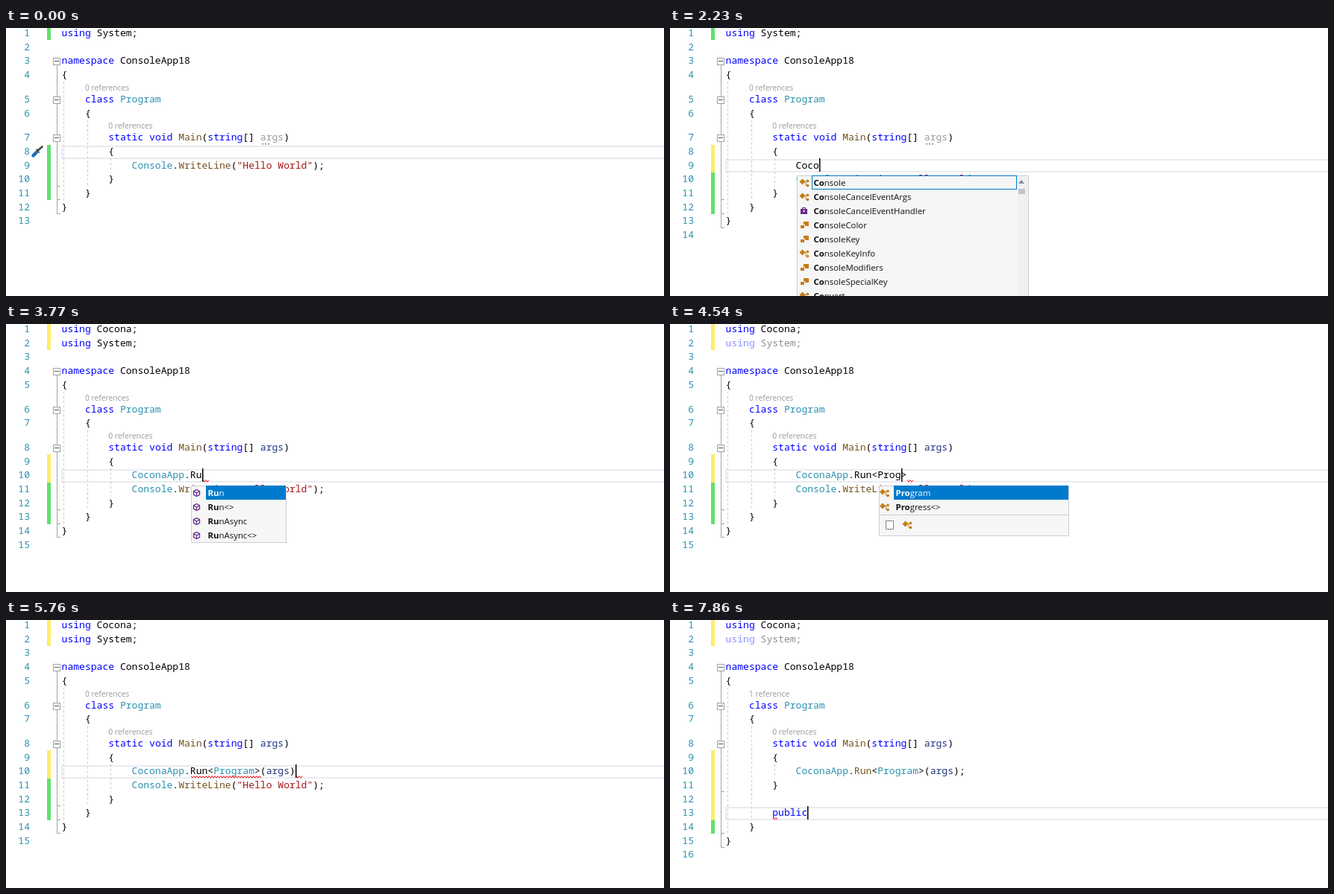
These frames come from a looping animation (882 px wide and 360 px high, 8 s). An HTML page with a canvas:

```html
<!DOCTYPE html>
<html lang="en">
<head>
<meta charset="utf-8">
<title>Code editor</title>
<style>
html, body { margin: 0; width: 100%; height: 100%; overflow: hidden; background: #fff; }
canvas { display: block; width: 882px; height: 360px; }
</style>
</head>
<body>
<canvas id="stage"></canvas>
<script>
const W = 882, H = 360, LOOP = 8000;
const LEFT = 74.6, CW = 7.83, PITCH = 18.7, LENS = 14;
const MONO = '"Noto Sans Mono", "DejaVu Sans Mono", monospace';
const SANS = '"Open Sans", "Noto Sans", sans-serif';
const BLUE = '#0000ff', TEAL = '#2b91af', BROWN = '#74531f', NAVY = '#1f377f';
const GREEN = '#62df70', YELLOW = '#ffec6a', PANEL = '#f6f6f6', EDGE = '#cccedb', LINK = '#0067b5';

const canvas = document.getElementById('stage');
const g = canvas.getContext('2d');
const dpr = window.devicePixelRatio || 1;
canvas.width = W * dpr;
canvas.height = H * dpr;

// Latest value whose start time has passed.
const at = (t, steps) => steps.reduce((v, [from, value]) => t >= from ? value : v, null);
const within = (t, a, b) => t >= a && t < b;

const APP = 'CoconaApp', RUN = APP + '.Run', CALL = RUN + '<Program>';
const TYPED = [
  [1260, '|'], [1690, 'C|'], [1860, 'Co|'], [2000, 'Coc|'], [2230, 'Coco|'], [2300, 'Cocon|'],
  [2370, 'Cocona|'], [2550, 'CoconaA|'], [2600, 'CoconaAp|'], [2650, APP + '|'], [3300, APP + '.|'],
  [3560, APP + '.R|'], [3770, APP + '.Ru|'], [3850, RUN + '|'], [4060, RUN + '<|>'],
  [4310, RUN + '<P|>'], [4380, RUN + '<Pr|>'], [4450, RUN + '<Pro|>'], [4520, RUN + '<Prog|>'],
  [4600, RUN + '<Progr|>'], [4660, RUN + '<Progra|>'], [4730, RUN + '<Program|>'],
  [4870, CALL + '|'], [4940, CALL + '(|)'], [5230, CALL + '(a|)'], [5330, CALL + '(ar|)'],
  [5400, CALL + '(arg|)'], [5470, CALL + '(args|)'], [5650, CALL + '(args)|'], [5790, CALL + '(args);|']
];
const MEMBER = [
  [7070, '|'], [7210, 'p|'], [7320, 'pu|'], [7540, 'pub|'], [7570, 'publ|'], [7790, 'publi|'], [7860, 'public|']
];
const CARET = [
  [0, 0], [660, 1], [940, 0], [1260, 1], [1610, 0], [1690, 1], [2700, 0], [3050, 1],
  [5970, 0], [6180, 1], [6890, 0], [7070, 1]
];
const CURRENT = [
  [0, 'open'], [1260, 'typed'], [6180, 'print'], [6320, 'close'], [6610, 'blank'], [7070, 'member']
];

// First letter of each item is its icon: m method, k keyword, c class, d delegate, e enum.
const P_LIST = ['kparams', 'kpartial', 'ePlatformID', 'cPlatformNotSupportedException', 'dPredicate<>', 'kprivate', 'cProgram', 'cProgress<>'];
const C_LIST = ['cConsole', 'cConsoleCancelEventArgs', 'dConsoleCancelEventHandler', 'eConsoleColor', 'eConsoleKey', 'cConsoleKeyInfo', 'eConsoleModifiers', 'eConsoleSpecialKey', 'cConvert'];
const A_LIST = ['k#if', 'k#region', 'cAccessViolationException', 'dAction', 'dAction<>', 'cActivator', 'cAggregateException'];
const AR_LIST = ['kargs', 'cArgumentException', 'cArgumentNullException', 'cArgumentOutOfRangeException', 'cArithmeticException', 'cArray', 'cArraySegment<>'];
const RUN_LIST = ['mRun', 'mRun<>', 'mRunAsync', 'mRunAsync<>'];
const APP_LIST = ['mCreateHostBuilder', 'mEquals', 'mReferenceEquals', ...RUN_LIST];
const POPUPS = [
  [0, null],
  [1730, { x: 170, w: 311, row: 'typed', items: C_LIST, match: 1, sel: 0, wide: 1 }],
  [1860, { x: 170, w: 311, row: 'typed', items: C_LIST, match: 2, sel: 0, wide: 1 }],
  [2230, { x: 170, w: 311, row: 'typed', items: C_LIST, match: 2, soft: 1, wide: 1 }],
  [2680, null],
  [3350, { x: 248, w: 128, row: 'typed', items: APP_LIST, match: 0 }],
  [3630, { x: 248, w: 128, row: 'typed', items: APP_LIST, match: 0, sel: 3 }],
  [3770, { x: 248, w: 128, row: 'typed', items: RUN_LIST, match: 2, sel: 0 }],
  [3850, { x: 248, w: 128, row: 'typed', items: RUN_LIST, match: 3, sel: 0 }],
  [4060, null],
  [4330, { x: 280, w: 255, row: 'typed', items: P_LIST, match: 1, sel: 6, wide: 1 }],
  [4450, { x: 280, w: 255, row: 'typed', items: ['cProgram', 'cProgress<>'], match: 3, sel: 0, bar: 1 }],
  [4730, null],
  [5260, { x: 350, w: 312, row: 'typed', items: A_LIST, match: 1, wide: 1, drop: 23 }],
  [5330, { x: 350, w: 312, row: 'typed', items: AR_LIST, match: 2, sel: 0, wide: 1, drop: 23 }],
  [5470, null],
  [7260, { x: 138, w: 256, row: 'member', items: P_LIST, match: 1, sel: 5, wide: 1 }],
  [7540, { x: 138, w: 256, row: 'member', items: ['kpublic', 'cPlatformNotSupportedException'], match: 1, sel: 0, bar: 1 }],
  [7860, null]
];

function rect(x, y, w, h, fill, stroke) {
  if (fill) { g.fillStyle = fill; g.fillRect(x, y, w, h); }
  if (stroke) {
    g.strokeStyle = stroke;
    g.lineWidth = 1;
    g.strokeRect(x + 0.5, y + 0.5, w - 1, h - 1);
  }
}

function path(points, color, width = 1, fill = false) {
  g.beginPath();
  points.forEach(([x, y]) => g.lineTo(x, y));
  if (fill) { g.fillStyle = color; g.fill(); return; }
  g.strokeStyle = color;
  g.lineWidth = width;
  g.stroke();
}

function disc(x, y, r, color) {
  g.fillStyle = color;
  g.beginPath();
  g.arc(x, y, r, 0, 7);
  g.fill();
}

// Draws text around a vertical centre and returns the end position.
function label(s, x, yc, color = '#111', size = 11.4, weight = 400) {
  g.font = `${weight} ${size}px ${SANS}`;
  g.fillStyle = color;
  g.fillText(s, x, Math.round(yc + 4));
  return x + g.measureText(s).width;
}

const WORDS = {};
'using namespace class static void string public'.split(' ').forEach(w => WORDS[w] = BLUE);
'Program Console'.split(' ').forEach(w => WORDS[w] = TEAL);
'Main WriteLine'.split(' ').forEach(w => WORDS[w] = BROWN);

function wordColor(word, t, id) {
  if (word[0] === '"') return '#a31515';
  if (word === APP) return t >= 3300 ? TEAL : '#000';
  if (word === 'Run') return t >= 5830 ? BROWN : '#000';
  if (word === 'args') return id === 'main' && t < 2650 ? '#999' : NAVY;
  return WORDS[word] || '#000';
}

function code(s, x, yc, t, id, cw = CW) {
  g.font = `${cw / 0.6}px ${MONO}`;
  for (const m of s.matchAll(/"[^"]*"|\w+|[^\w\s"]+/g)) {
    g.fillStyle = wordColor(m[0], t, id);
    g.fillText(m[0], x + m.index * cw, Math.round(yc + 4));
  }
}

function squiggle(x0, x1, y) {
  const pts = [];
  for (let x = x0, i = 0; x <= x1; x += 2, i++) pts.push([x, y + (i % 2 ? 1.3 : -1.3)]);
  path(pts, '#f00');
}

// Current document with line positions.
function buildLines(t) {
  const typed = (at(t, TYPED) || '').replace('|', '');
  const member = (at(t, MEMBER) || '').replace('|', '');
  const pad = n => ' '.repeat(n);
  const lines = [];
  const add = (id, text, mark, lens) => lines.push({ id, text, mark, lens });
  const imported = t >= 3050;
  if (imported) add('cocona', 'using Cocona;', YELLOW);
  add('system', 'using System;', imported ? YELLOW : GREEN);
  add('gap', '');
  add('ns', 'namespace ConsoleApp18');
  add('nsOpen', '{');
  add('class', pad(4) + 'class Program', null, t >= 6610 ? '1 reference' : '0 references');
  add('classOpen', pad(4) + '{');
  add('main', pad(8) + 'static void Main(string[] args)', null, '0 references');
  add('open', pad(8) + '{', t >= 1260 ? YELLOW : GREEN);
  if (t >= 1260) add('typed', pad(12) + typed, YELLOW);
  if (t < 6320) add('print', pad(12) + 'Console.WriteLine("Hello World");', GREEN);
  add('close', pad(8) + '}', t >= 6610 ? YELLOW : GREEN);
  if (t >= 6610) add('blank', '', YELLOW);
  if (t >= 7070) add('member', pad(8) + member, YELLOW);
  add('classClose', pad(4) + '}', GREEN);
  add('nsClose', '}');
  add('end', '');
  let y = 7;
  lines.forEach((line, i) => {
    if (i) y += PITCH;
    if (line.lens) y += LENS;
    line.y = y;
    line.top = y - PITCH / 2;
    line.bottom = y + PITCH / 2;
  });
  return lines;
}

function screwdriver(y) {
  g.lineCap = 'round';
  path([[42, y - 1], [48.5, y - 6.5]], '#424242', 2.6);
  path([[41, y - 2.5], [44, y + 1]], '#424242', 2);
  path([[36.5, y + 5.5], [40.5, y + 1.5]], '#1c6fb5', 4.4);
  g.lineCap = 'butt';
}

function structure(row) {
  const end = Math.round(row.nsClose.bottom);
  path([[68.5, row.ns.y], [68.5, end]], '#a5a5a5');
  for (const id of ['close', 'classClose', 'nsClose']) {
    const y = Math.round(row[id].bottom) - 0.5;
    path([[68, y], [73, y]], '#a5a5a5');
  }
  for (const id of ['ns', 'class', 'main']) {
    const y = Math.round(row[id].y);
    rect(63, y - 4, 10, 10, '#fff', '#a0a0a0');
    path([[65, y + 0.5], [71, y + 0.5]], '#555');
  }
  g.setLineDash([3, 3]);
  [['nsOpen', 'nsClose', 77.5], ['classOpen', 'classClose', 109.5], ['open', 'close', 140.5]].forEach(([a, b, x]) =>
    path([[x, row[a].bottom], [x, row[b].top]], '#c8c8c8'));
  g.setLineDash([]);
}

function editor(t, lines, row) {
  const cur = row[at(t, CURRENT)];
  g.strokeStyle = '#eaeaf2';
  g.lineWidth = 2;
  g.strokeRect(75, Math.round(cur.top) + 2, W, 16);

  lines.forEach((line, i) => {
    const top = Math.round(line.top);
    if (line.mark) rect(55, top, 5, Math.round(line.bottom) - top, line.mark);
    g.font = `${CW / 0.6}px ${MONO}`;
    g.fillStyle = TEAL;
    g.textAlign = 'right';
    g.fillText(i + 1, 32, Math.round(line.y + 4));
    g.textAlign = 'left';
    if (line.lens) label(line.lens, LEFT + line.text.search(/\S/) * CW, line.y - 16, '#999', 10.3);
  });
  structure(row);

  if (within(t, 6400, 6680)) {
    for (const id of ['open', 'close']) rect(137, Math.round(row[id].top) + 1, 8, 18, '#dbe0cc');
  }
  const unused = within(t, 3840, 4900) || t >= 6750;
  for (const line of lines) {
    g.globalAlpha = line.id === 'system' && unused ? 0.45 : 1;
    code(line.text, LEFT, line.y, t, line.id);
  }
  g.globalAlpha = 1;
  if (t < 2650) for (let i = 0; i < 3; i++) rect(343 + i * 4, row.main.y + 7.5, 2, 2, '#999');

  if (t < 1260) screwdriver(row.open.y);
  if (within(t, 1330, 1690)) screwdriver(row.typed.y);
  if (within(t, 6890, 7070)) screwdriver(row.blank.y);

  if (within(t, 3350, 5830)) {
    const len = row.typed.text.length, y = row.typed.bottom - 1.8;
    if (t >= 4870) squiggle(248, 342, y);
    const x = Math.round(LEFT + len * CW);
    if (t < 5790) squiggle(x + 1, x + 9, y);
  }
  if (t >= 7320) squiggle(138, 145, row.member.bottom - 1.8);

  if (at(t, CARET)) {
    const typedCol = 12 + (at(t, TYPED) || '').indexOf('|');
    const memberCol = 8 + (at(t, MEMBER) || '').indexOf('|');
    const col = { open: 9, typed: typedCol, print: 41, close: 9, blank: 8, member: memberCol }[cur.id];
    rect(Math.round(LEFT + col * CW), Math.round(cur.top), 1.5, 18, '#000');
  }
}

function icon(kind, x, y) {
  if (kind === 'm') {
    const hex = [[0, -4.5], [4, -2.3], [4, 2.3], [0, 4.5], [-4, 2.3], [-4, -2.3], [0, -4.5]];
    path(hex.map(([a, b]) => [x + a, y + b]), '#652d90', 1.3);
    path([[x - 4, y - 2.3], [x, y], [x + 4, y - 2.3]], '#652d90', 1.1);
    path([[x, y], [x, y + 4.5]], '#652d90', 1.1);
  } else if (kind === 'k') {
    g.setLineDash([2, 1]);
    rect(x - 5, y - 6, 11, 12, '#fff', '#424242');
    g.setLineDash([]);
  } else if (kind === 'd') {
    rect(x - 5, y - 3, 9, 7, '#652d90');
    rect(x - 3, y - 5, 5, 3, null, '#652d90');
    rect(x - 1.5, y - 1, 2, 2, '#fff');
  } else if (kind === 'e') {
    rect(x - 1, y - 5, 7, 6, '#c27d1a');
    rect(x - 6, y - 1, 7, 6, '#c27d1a', PANEL);
  } else {
    const diamond = (cx, cy, r) => path([[cx - r, cy], [cx, cy - r], [cx + r, cy], [cx, cy + r]], '#c27d1a', 1, true);
    diamond(x - 2.5, y - 1.5, 4);
    diamond(x + 4.5, y - 2.5, 2.3);
    diamond(x + 4.5, y + 3.5, 2.3);
    path([[x, y - 2], [x + 2, y - 2], [x + 2, y + 3.5], [x + 4, y + 3.5]], '#c27d1a');
  }
}

function popup(p, row) {
  const top = Math.round(row[p.row].y + 13.4) + (p.drop || 0);
  const textX = p.x + 22.5, iconX = p.x + (p.wide ? 10 : 7.5);
  const right = p.x + p.w - (p.wide ? 16 : 1);
  const h = p.wide ? 200 : p.items.length * 19 + 1 + (p.bar ? 29 : 0);
  rect(p.x, top, p.w, h, PANEL, EDGE);
  p.items.forEach((item, i) => {
    const y = top + i * 19, name = item.slice(1), chosen = i === p.sel;
    const color = chosen ? '#fff' : '#111';
    if (chosen) rect(p.x + 20, y, right - p.x - 20, 19, '#007acc');
    if (p.soft && i === 0) rect(p.x + 20, y, right - p.x - 20, 19, null, '#007acc');
    icon(item[0], iconX, y + 10);
    const x = label(name.slice(0, p.match), textX, y + 9.6, color, 11.4, 700);
    label(name.slice(p.match), x, y + 9.6, color);
  });
  if (p.bar) {
    const y = top + h - 15;
    path([[p.x, y - 13.5], [p.x + p.w, y - 13.5]], EDGE);
    icon('k', p.x + 14, y);
    icon('c', p.x + 38, y);
  }
  if (p.wide) {
    const x = p.x + p.w - 15;
    rect(x, top + 1, 14, h, '#f0f0f3');
    path([[x + 1, top + 11], [x + 5, top + 6], [x + 9, top + 11]], '#868999', 1, true);
    rect(x + 1, top + 18, 9, 7, '#c2c3c9');
  }
}

function signature() {
  rect(168, 213, 659, 18, '#fff');
  rect(169, 216, 657, 23, PANEL, EDGE);
  const parts = [
    ['void ', BLUE], [APP, TEAL], ['.Run<'], ['Program', TEAL], ['>('], ['string[]', BLUE, 700],
    [' args', NAVY], [', ['], ['Action', TEAL], ['<Cocona.Hosting.'], ['CoconaAppOptions', TEAL],
    ['>? '], ['configureOptions', NAVY], [' = '], ['null', BLUE], ['])']
  ];
  parts.reduce((x, [s, color, weight]) => label(s, x, 226, color, 11.72, weight), 177.5);
}

function cross(x, y, r, badge) {
  disc(x, y, badge, '#e51400');
  path([[x - r, y - r], [x + r, y + r]], '#fff', 1.4);
  path([[x - r, y + r], [x + r, y - r]], '#fff', 1.4);
}

function fixMenu(t) {
  rect(30, 176, 36, 22, PANEL, EDGE);
  disc(41.5, 184.5, 4.8, '#fcc419');
  rect(39.5, 188, 4, 5, '#777');
  cross(45.5, 190.5, 1.7, 4);
  path([[55, 186], [60.5, 186], [57.7, 189]], '#717171', 1, true);
  if (t < 2760) return;

  rect(30, 197, 240, 141, PANEL, EDGE);
  rect(33, 200, 234, 22, '#c9def5');
  rect(244, 200, 22, 22, '#f0f7fd', '#5aa9ec');
  path([[254, 208.5], [257, 211.5], [254, 214.5]], '#717171', 1, true);
  path([[33, 225.5], [267, 225.5]], '#e0e3e6');
  label('using Cocona;', 36.8, 211.5);
  ['Cocona.CoconaApp', "Generate class 'CoconaApp' in new file", "Generate class 'CoconaApp'",
    "Generate nested class 'CoconaApp'", 'Generate new type...'
  ].forEach((s, i) => label(s, 36.8, 237 + i * 22));
  if (t < 2840) return;

  rect(267, 200, 412, 125, PANEL, EDGE);
  cross(282, 215, 2.3, 6);
  label('CS0246', 294.5, 215.5, LINK);
  label("The type or namespace name 'CoconaApp' could not be found", 337.5, 215.5);
  label('(are you missing a using directive or an assembly reference?)', 273.5, 230.5);
  rect(268, 241, 410, 56, '#fff');
  path([[268, 241.5], [678, 241.5]], '#a5a5a5');
  path([[268, 297.5], [678, 297.5]], EDGE);
  rect(275, 243, 398, 15, '#d7e3bc');
  ['using Cocona;', 'using System;', '...'].forEach((s, i) => code(s, 275.4, 251 + i * 16.4, t, '', 7));
  label('Preview changes', 277.5, 311, LINK);
}

function draw(t) {
  g.setTransform(dpr, 0, 0, dpr, 0, 0);
  rect(0, 0, W, H, '#fff');
  const lines = buildLines(t);
  const row = Object.fromEntries(lines.map(line => [line.id, line]));
  editor(t, lines, row);
  if (within(t, 2720, 3050)) fixMenu(t);
  if (within(t, 5000, 5690)) signature();
  const p = at(t, POPUPS);
  if (p) popup(p, row);
}

const start = performance.now();
function frame() {
  draw((performance.now() - start) % LOOP);
  requestAnimationFrame(frame);
}
frame();
</script>
</body>
</html>
```
